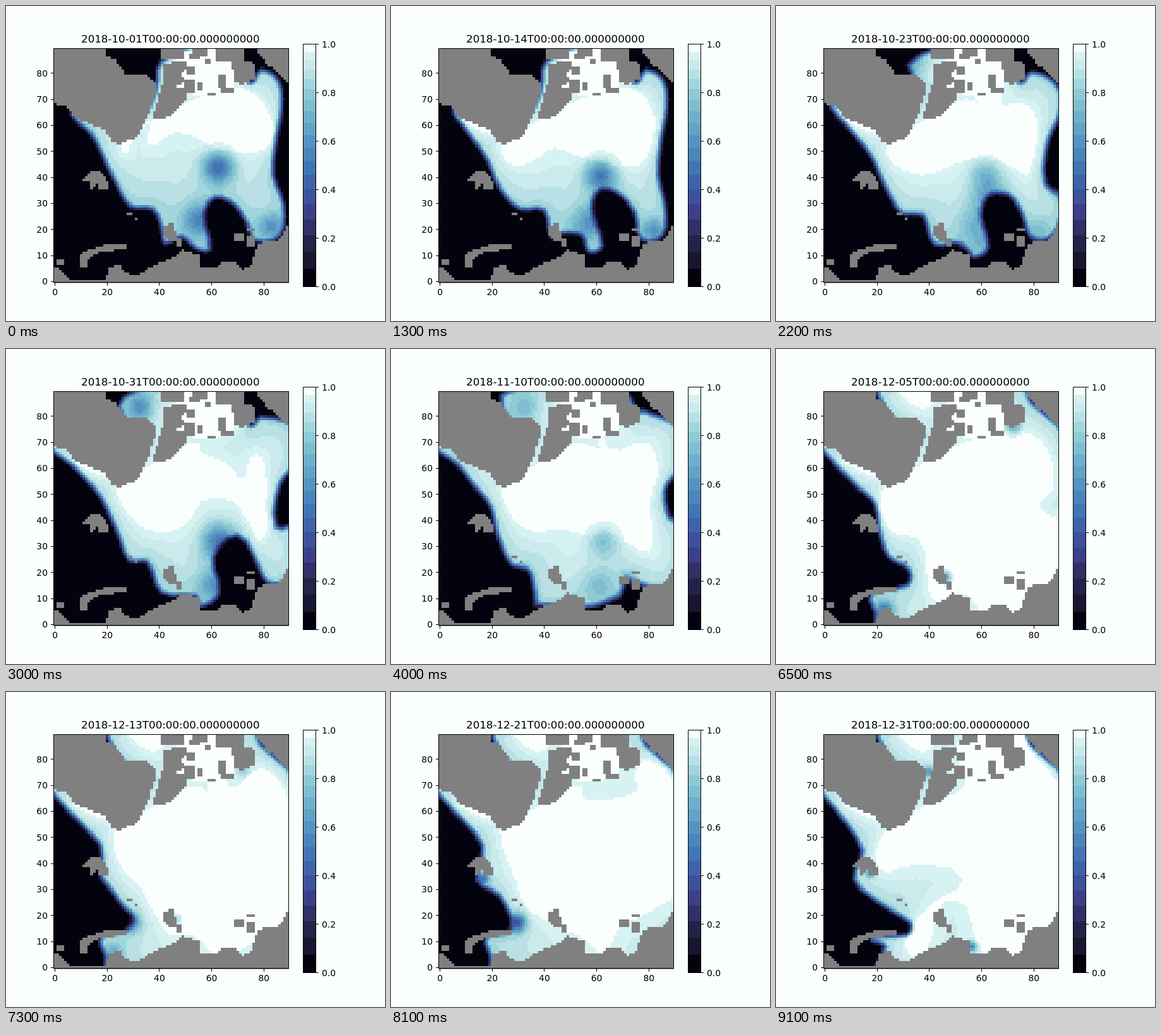
An HTML page with a canvas for the animation above (9.2 s loop, 600 px wide and 500 px high).

```html
<!DOCTYPE html>
<html lang="en">
<head>
<meta charset="utf-8">
<title>Ice concentration</title>
<style>
html, body { margin: 0; width: 100%; height: 100%; overflow: hidden; background: #fafffe; }
canvas { display: block; }
</style>
</head>
<body>
<canvas id="stage" width="600" height="500"></canvas>
<script>
const N = 90, LEFT = 75.5, TOP = 67.5, SIZE = 372, CELL = SIZE / N;
const DAYS = 92, STEP = 100;
const ctx = document.getElementById('stage').getContext('2d');
const clamp = (v, a = 0, b = 1) => Math.min(b, Math.max(a, v));
const mix = (a, b, t) => a + (b - a) * t;

// Signed distance to a polygon, positive inside
function polyDist(p, x, y) {
  let best = 1e9, inside = false;
  for (let i = 0, j = p.length - 2; i < p.length; j = i, i += 2) {
    const ax = p[j], ay = p[j + 1], dx = p[i] - ax, dy = p[i + 1] - ay;
    const t = clamp(((x - ax) * dx + (y - ay) * dy) / (dx * dx + dy * dy || 1));
    const ex = x - ax - t * dx, ey = y - ay - t * dy;
    best = Math.min(best, ex * ex + ey * ey);
    if ((ay > y) !== (p[i + 1] > y) && x < ax + dx * (y - ay) / dy) inside = !inside;
  }
  return Math.sqrt(best) * (inside ? 1 : -1);
}

// Closed curve through the points, tangents scaled to each segment
function smooth(p) {
  const n = p.length / 2, out = [];
  const at = i => { const k = (i + n) % n * 2; return [p[k], p[k + 1]]; };
  const dir = i => {
    const [a, b] = at(i - 1), [c, d] = at(i + 1), l = Math.hypot(c - a, d - b) || 1;
    return [(c - a) / l, (d - b) / l];
  };
  for (let i = 0; i < n; i++) {
    const a = at(i), b = at(i + 1), u = dir(i), v = dir(i + 1);
    const len = Math.hypot(b[0] - a[0], b[1] - a[1]);
    for (let s = 0; s < 3; s++) {
      const t = s / 3, h = t * t * (3 - 2 * t);
      for (const k of [0, 1])
        out.push(mix(a[k], b[k], h) + len * t * (1 - t) * (u[k] * (1 - t) - v[k] * t));
    }
  }
  return out;
}

const grid = fn => Float32Array.from({ length: N * N }, (_, i) =>
  fn(LEFT + (i % N + .5) * CELL, TOP + (Math.floor(i / N) + .5) * CELL));

const shores = [];
const land = (...p) => shores.push(p);
const box = (x, y, x2, y2) => land(x, y, x2, y, x2, y2, x, y2);

// North-west mainland
land(70, 60, 158, 60, 160, 78, 173, 86, 190, 108, 222, 110, 236, 122, 236, 138, 226, 170,
  216, 190, 208, 208, 178, 220, 168, 216, 156, 196, 130, 186, 108, 178, 96, 158, 80, 157, 70, 150);
// Northern islands
box(246, 60, 283, 82);
land(296, 60, 322, 60, 320, 80, 290, 84);
land(250, 91, 284, 89, 286, 99, 278, 107, 282, 118, 270, 129, 284, 130, 286, 150, 270, 166,
  252, 179, 230, 179, 241, 146, 248, 122);
land(332, 60, 379, 60, 379, 88, 395, 92, 395, 113, 374, 126, 362, 120, 357, 90, 332, 86);
box(286, 95, 299, 107);
box(335, 107, 350, 128);
box(342, 128, 360, 137);
box(284, 116, 298, 138);
box(302, 121, 313, 134);
box(316, 86, 324, 94);
box(320, 138, 332, 143);
// North-east
land(398, 60, 400, 74, 413, 92, 436, 110, 447, 123, 460, 125, 460, 60);
// Southern mainland
land(70, 410, 83, 416, 96, 430, 100, 435, 156, 435, 165, 415, 181, 410, 186, 423, 210, 428,
  226, 415, 272, 396, 279, 387, 305, 396, 306, 416, 330, 416, 346, 406, 364, 408, 376, 418,
  390, 408, 394, 388, 401, 376, 434, 371, 447, 346, 460, 344, 460, 450, 70, 450);
// Southern and western islands
land(116, 395, 116, 415, 128, 416, 128, 405, 144, 392, 190, 385, 190, 377, 160, 377, 136, 385);
land(135, 262, 150, 262, 162, 280, 162, 290, 148, 290, 144, 283, 133, 292, 134, 279, 121, 276);
land(257, 346, 264, 346, 269, 358, 269, 374, 252, 370, 248, 352);
box(79, 402, 91, 411);
box(191, 327, 199, 332);
box(203, 336, 208, 340);
box(268, 370, 278, 380);
box(362, 363, 378, 374);
box(382, 351, 394, 358);
box(382, 366, 394, 380);
const isLand = grid((x, y) => shores.some(p => polyDist(p, x, y) > 0) ? 1 : 0);

// Each key day: the ice edge, areas of full cover and thin patches
const keys = [];
const last = () => keys[keys.length - 1];
const keyDay = day => keys.push({ day, edge: [], full: [], thin: [] });
const edge = (...p) => last().edge.push(smooth(p));
const full = (...p) => last().full.push(smooth(p));
const thin = (x, y, r, loss) => last().thin.push({ x, y, r, loss });

const coast = [300, 148, 240, 176, 196, 210];
const northEarly = [386, 122, 340, 60, 246, 88, 236, 135, 200, 190, 120, 155];
const eastEarly = [423, 268, 428, 212, 437, 160, 432, 120, 404, 101, ...northEarly];
const northLate = [390, 60, 165, 62, 176, 100, 215, 150, 120, 155, 70, 146];
const eastLate = [160, 445, 460, 445, 460, 144, 404, 84, ...northLate];
const isles = () => full(285, 62, 332, 62, 362, 126, 272, 130);
const bay = () => full(195, 60, 255, 60, 240, 94, 210, 84);
const strip = () => full(108, 176, 150, 188, 158, 202, 130, 192);

keyDay(0);
edge(104, 172, 134, 202, 154, 240, 174, 282, 198, 318, 232, 322, 246, 352, 252, 376, 278, 366,
  300, 384, 322, 386, 314, 332, 330, 304, 362, 316, 382, 346, 394, 372, 434, 364, 440, 316, ...eastEarly);
full(184, 212, 188, 234, 200, 216, 228, 182, 224, 222, 270, 200, 338, 226, 410, 228, 420, 178,
  388, 136, 350, 128, ...coast);
isles();
thin(336, 256, 24, .46);
thin(306, 340, 26, .3);
thin(420, 350, 20, .25);

keyDay(13);
edge(98, 162, 118, 196, 152, 244, 172, 290, 204, 322, 242, 324, 254, 368, 272, 360, 302, 364,
  314, 390, 334, 380, 318, 322, 332, 290, 366, 302, 386, 330, 396, 370, 430, 364, 434, 318, ...eastEarly);
full(176, 222, 186, 250, 222, 248, 258, 226, 302, 240, 390, 254, 414, 214, 414, 164, 388, 134,
  350, 130, ...coast);
isles();
strip();
thin(332, 268, 24, .4);
thin(314, 345, 26, .25);
thin(415, 356, 18, .25);

keyDay(30);
edge(70, 150, 104, 184, 150, 236, 178, 296, 196, 336, 224, 338, 246, 386, 300, 392, 310, 408,
  338, 385, 328, 332, 366, 296, 396, 338, 414, 370, 440, 370, 465, 340, 460, 282, 428, 282,
  434, 214, 460, 180, 460, 126, 404, 108, 386, 122, 340, 60, 226, 60, 178, 92, 215, 150, 120, 155);
full(174, 222, 196, 264, 228, 288, 282, 282, 310, 242, 360, 242, 384, 276, 406, 304, 412, 250,
  408, 176, 388, 170, 376, 206, 350, 182, 312, 166, ...coast);
isles();
strip();
thin(336, 305, 25, .35);
thin(330, 375, 24, .25);
thin(212, 92, 20, .3);

keyDay(50);
edge(70, 158, 104, 180, 132, 222, 158, 252, 160, 296, 184, 346, 212, 362, 208, 394, 184, 420,
  184, 440, 300, 412, 340, 412, 372, 416, 398, 390, 460, 370, 460, 272, 436, 226, 460, 194,
  460, 132, 402, 88, ...northLate);
full(174, 222, 204, 288, 276, 288, 284, 334, 376, 330, 426, 340, 416, 290, 408, 240, 432, 200,
  430, 150, 436, 126, 380, 134, ...coast);
full(262, 364, 274, 390, 200, 428, 196, 418, 244, 388);
full(346, 374, 396, 358, 386, 390, 364, 380);
isles();
thin(376, 362, 10, .3);

keyDay(65);
edge(70, 156, 100, 190, 132, 222, 156, 246, 164, 290, 178, 330, 210, 350, 208, 374, 150, 390,
  158, 420, ...eastLate);
full(170, 220, 166, 252, 184, 290, 222, 300, 236, 326, 250, 400, 300, 388, 330, 420, 460, 430,
  460, 282, 416, 250, 440, 220, 430, 160, 390, 130, ...coast);
isles();
bay();
strip();
thin(376, 124, 12, .25);
thin(172, 414, 14, .35);
thin(268, 362, 9, .35);

keyDay(81);
edge(70, 156, 100, 190, 144, 244, 136, 300, 170, 322, 190, 376, 150, 390, 158, 420, ...eastLate);
full(172, 222, 196, 296, 214, 340, 262, 372, 300, 388, 340, 416, 358, 376, 410, 348, 460, 310,
  460, 168, 412, 108, 384, 130, 390, 158, 308, 170, ...coast);
isles();
bay();
strip();
thin(200, 366, 14, .5);
thin(146, 297, 9, .4);

keyDay(91);
edge(70, 158, 100, 194, 136, 252, 124, 298, 168, 338, 212, 368, 206, 384, 150, 392, 172, 404, ...eastLate);
full(176, 214, 162, 282, 222, 274, 296, 296, 246, 336, 206, 392, 214, 418, 240, 408, 264, 335,
  300, 340, 330, 416, 460, 430, 460, 172, 410, 100, 380, 60, 285, 80, ...coast);
bay();
strip();
thin(204, 374, 10, .5);
thin(241, 126, 8, .3);
thin(150, 287, 7, .4);
thin(310, 404, 8, .4);

const dist = polys => grid((x, y) => Math.max(...polys.map(p => polyDist(p, x, y))));
for (const k of keys) {
  const patches = k.thin;
  k.edge = dist(k.edge);
  k.full = dist(k.full);
  k.thin = grid((x, y) => patches.reduce((s, p) =>
    s + p.loss * Math.exp(-((x - p.x) ** 2 + (y - p.y) ** 2) / p.r ** 2), 0));
}

// Colour scale in flat bands, narrower towards the light end
const BANDS = 19;
const bandStart = i => i / BANDS * (1 + .39 * (1 - i / BANDS));
const stops = ['040613', '17162c', '292650', '3c3e86', '3e5aa6', '4279b6', '5695c1', '6eb1cc',
  '91cdd5', 'c5e7ea', 'eafdfd'].map(h => h.match(/../g).map(c => parseInt(c, 16)));
const colours = Array.from({ length: BANDS }, (_, i) => {
  if (i === 0) return [2, 3, 14];
  if (i === BANDS - 1) return [250, 255, 254];
  const v = (bandStart(i) + bandStart(i + 1)) * 5, k = Math.floor(v);
  return stops[k].map((c, n) => Math.round(mix(c, stops[k + 1][n], v - k)));
});
function colour(c) {
  let i = BANDS - 1;
  while (i && c < bandStart(i)) i--;
  return colours[i];
}

const map = document.createElement('canvas');
map.width = map.height = N;
const mapCtx = map.getContext('2d'), pixels = mapCtx.createImageData(N, N);

function drawMap(day) {
  let k = 0;
  while (k < keys.length - 2 && day >= keys[k + 1].day) k++;
  const a = keys[k], b = keys[k + 1], t = (day - a.day) / (b.day - a.day);
  for (let i = 0; i < N * N; i++) {
    const at = name => mix(a[name][i], b[name][i], t);
    const inner = at('full'), outer = at('edge');
    const rim = clamp((outer + 5) / 11), depth = Math.max(outer, 0);
    const cover = inner > 0 ? 1 : .81 + .15 * Math.pow(depth / (depth - inner || 1), .7);
    const rgb = isLand[i] ? [128, 128, 128] : colour(clamp(rim * (cover - at('thin'))));
    pixels.data.set([...rgb, 255], i * 4);
  }
  mapCtx.putImageData(pixels, 0, 0);
  ctx.imageSmoothingEnabled = false;
  ctx.drawImage(map, LEFT, TOP, SIZE, SIZE);
}

function text(s, x, y, align, size = 13.89) {
  ctx.font = size + 'px "DejaVu Sans", sans-serif';
  ctx.textAlign = align;
  ctx.fillText(s, x, y);
}

function draw(day) {
  ctx.fillStyle = '#fafffe';
  ctx.fillRect(0, 0, 600, 500);
  drawMap(day);
  const barY = i => Math.round(445 - bandStart(i) * 385);
  colours.forEach((c, i) => {
    ctx.fillStyle = `rgb(${c})`;
    ctx.fillRect(470, barY(i + 1), 20, barY(i) - barY(i + 1));
  });
  ctx.fillStyle = ctx.strokeStyle = '#000';
  ctx.lineWidth = 1;
  ctx.strokeRect(LEFT, TOP, SIZE, SIZE - 1);
  ctx.strokeRect(470.5, 60.5, 20, 385);
  for (let v = 0; v <= 80; v += 10) {
    const y = TOP + SIZE - (v + .5) * CELL;
    ctx.fillRect(71, Math.round(y - .5), 5, 1);
    text(v, 66, y + 5, 'right');
    if (v % 20) continue;
    const x = LEFT + (v + .5) * CELL;
    ctx.fillRect(Math.round(x - .5), 439, 1, 5);
    text(v, x, 459, 'center');
  }
  for (let i = 0; i <= 5; i++) {
    const y = 445 - i * 77;
    ctx.fillRect(491, y, 4, 1);
    text((i / 5).toFixed(1), 500, y + 5.5, 'left');
  }
  const date = new Date(Date.UTC(2018, 9, 1 + day)).toISOString().slice(0, 19);
  text(date + '.000000000', 260.3, 58, 'center', 16.67);
}

let shown = -1;
const start = performance.now();
function tick() {
  const day = Math.floor((performance.now() - start) / STEP) % DAYS;
  if (day !== shown) draw(shown = day);
  requestAnimationFrame(tick);
}
tick();
</script>
</body>
</html>
```
